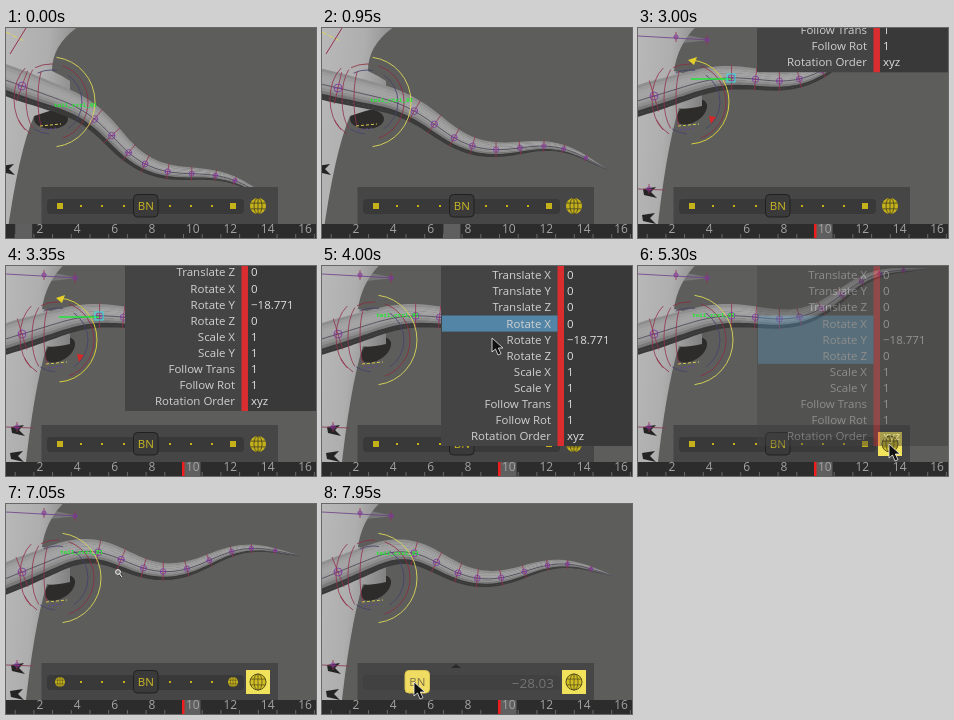
Write an HTML page that moves like this. It is 310 px wide and 210 px high and loops after 8 s.

```html
<!DOCTYPE html>
<html lang="en">
<head>
<meta charset="utf-8">
<title>Tail animation</title>
<style>
html, body { margin: 0; width: 310px; height: 210px; overflow: hidden; background: #5d5e5b; }
svg { display: block; font: 11.5px "Open Sans", sans-serif; }
</style>
</head>
<body>
<svg id="stage" width="310" height="210" viewBox="0 0 310 210"></svg>
<script>
const stage = document.getElementById('stage');
const LOOP = 8000, STEP = 50, TAIL_LENGTH = 288;

// lift: 0 for a lowered hip, 1 for a raised one. bend: tail headings in degrees from root to tip.
const pose = (rootY, lift, ...bend) => [rootY, lift, ...bend];
const LOW = pose(58, 0, 20, 47, 2, 33);
const MID = pose(60, 0, 13, 36, -7, 29);
const HIGH = pose(68, 1, -17, 6, -37, -2);
const BENT = pose(68, 1, -22, 23, -24, 12);
const DROPPED = pose(68, 1, -22, 28, -18, 18);
const BEND_AT = [30, 105, 195, 270];
const CYCLE = [[1, LOW], [7, MID], [10, HIGH], [12, HIGH], [18, LOW]];

const ROWS = ['Translate X|0', 'Translate Y|0', 'Translate Z|0', 'Rotate X|0', 'Rotate Y|−18.771', 'Rotate Z|0',
  'Scale X|1', 'Scale Y|1', 'Follow Trans|1', 'Follow Rot|1', 'Rotation Order|xyz'];

const clamp = v => Math.max(0, Math.min(1, v));
const lerp = (a, b, k) => Array.isArray(a) ? a.map((v, i) => lerp(v, b[i], k)) : a + (b - a) * k;
const ease = k => k * k * (3 - 2 * k);
const same = k => k;
const span = (t, from, to) => clamp((t - from) / (to - from));
const within = (t, from, to) => t >= from && t < to;

function track(t, keys, curve = same) {
  const i = keys.findIndex(k => k[0] > t);
  if (i < 0) return keys[keys.length - 1][1];
  if (i === 0) return keys[0][1];
  const [a, b] = [keys[i - 1], keys[i]];
  return lerp(a[1], b[1], curve((t - a[0]) / (b[0] - a[0])));
}

const rect = (x, y, w, h, fill, more = '') =>
  `<rect x="${x}" y="${y}" width="${w}" height="${h}" fill="${fill}" ${more}/>`;
const line = (x1, y1, x2, y2, color, width = 1, dash = '') =>
  `<path d="M${x1} ${y1}L${x2} ${y2}" stroke="${color}" stroke-width="${width}" stroke-dasharray="${dash}"/>`;
const oval = (x, y, rx, ry, color, width = 1, dash = '') =>
  `<ellipse cx="${x}" cy="${y}" rx="${rx}" ry="${ry}" fill="none" stroke="${color}" stroke-width="${width}" pathLength="100" stroke-dasharray="${dash}"/>`;
const poly = (pts, fill) => `<polygon points="${pts.map(p => p.map(v => v.toFixed(1))).join(' ')}" fill="${fill}"/>`;
const text = (x, y, s, fill, more = '') => `<text x="${x}" y="${y}" fill="${fill}" ${more}>${s}</text>`;

function frameAt(t) {
  if (t < 1050) return 1 + Math.round(t * .024) % 17;
  return track(t, [[1250, 9], [1450, 5], [1950, 12.4], [2000, 12], [2050, 10]]);
}

function poseAt(t) {
  if (t >= 7300) return lerp(BENT, DROPPED, ease(span(t, 7500, 7950)));
  if (t >= 5500) return lerp(HIGH, BENT, ease(span(t, 5500, 6150)));
  return track(frameAt(t), CYCLE, ease);
}

// Walks along the tail in equal steps, turning with the bend.
function spineOf([rootY, , ...bend]) {
  const step = 4, keys = BEND_AT.map((u, i) => [u, bend[i]]);
  const first = bend[0] * Math.PI / 180, points = [];
  let x = 16 - 28 * Math.cos(first), y = rootY - 28 * Math.sin(first);
  for (let u = -28; u <= TAIL_LENGTH; u += step) {
    const a = track(u, keys, ease) * Math.PI / 180;
    points.push({ x, y, nx: -Math.sin(a), ny: Math.cos(a), w: 15 * Math.pow(1 - Math.max(0, u) / TAIL_LENGTH, .8) + .2 });
    x += step * Math.cos(a);
    y += step * Math.sin(a);
  }
  return points;
}
const pointAt = (spine, u) => spine[Math.round((u + 28) / 4)];

function marker({ x, y, nx, ny, w }) {
  const r = 1.4 + w * .17, l = w + 1;
  return line(x - nx * l, y - ny * l, x + nx * l, y + ny * l, '#96304f', .8)
    + oval(x, y, r, r, '#7d35a0', .8) + line(x - r, y, x + r, y, '#7d35a0', .8);
}

function tail(spine) {
  const edge = f => spine.map(p => [p.x + p.nx * p.w * f, p.y + p.ny * p.w * f]);
  let out = '';
  for (let i = 0; i < 10; i++) {
    const f = i / 5 - 1, v = 58 + 106 * Math.sqrt(Math.max(0, 1 - (f + .4) ** 2));
    out += poly([...edge(f), ...edge(Math.min(1, f + .22)).reverse()], `rgb(${v},${v},${v})`);
  }
  out += `<polyline points="${edge(0).map(p => p.map(v => v.toFixed(1))).join(' ')}" fill="none" stroke="#4b4355" stroke-width=".8"/>`;
  out += marker(pointAt(spine, 0));
  for (let u = 80; u < 270; u += 23) out += marker(pointAt(spine, u));
  return out;
}

function body(lift) {
  const v = (low, high) => lerp(low, high, lift).toFixed(1);
  const skin = `M-5-5H${v(78, 62)}Q${v(46, 40)} 14 ${v(46, 36)} 43Q55 47 64 53V78`
    + `Q45 82 ${v(28, 41)} ${v(88, 80)}Q${v(12, 27)} 125 ${v(0, 18)} 215H-5Z`;
  const x = lerp(45, 54, lift), y = lerp(91, 84, lift);
  return `<ellipse cx="${x}" cy="${y}" rx="17" ry="10" fill="#2d2c2b" transform="rotate(${-35 * lift} ${x} ${y})"/>`
    + `<path d="${skin}" fill="url(#skin)"/>`;
}

const feather = (x, y) => poly([[x, y], [x + 13, y - 2], [x + 8, y + 3], [x + 14, y + 9], [x + 1, y + 6]], '#242424');

function rings(lift, spine, selected) {
  const x = lerp(45, 51, lift), y = 74;
  const labelY = 50 + (pointAt(spine, 80).y - 51) * .68;
  let out = oval(x, y, 37, 38, '#8d2b42', .8, '20 14 8 26 8 4 20') + oval(x, y, 31, 32, '#44406f', .8, '16 10 8 34 10 6 16');
  for (let i = 0; i < 3; i++) out += oval(x - 4 - 5 * i, y - 3, 9 + 7 * i, 36, '#92304b', .8, '0 32 36 32');
  if (selected) {
    out += oval(x, y, 40, 42, '#d8ce3d', 1, '24 52 24')
      + `<path d="M50 32l9-3-3 8z" fill="#e5cf28"/><path d="M71 88l7 1-5 7z" fill="#d52828"/>`
      + line(53, 51, 93, 51, '#22e43a', 1.4) + rect(89, 46, 8, 8, 'none', 'stroke="#30e0e0"');
  } else {
    out += oval(x, y, 44, 45, '#dcd75a', .9, '23 54 23')
      + text(x + 3, labelY + 2, 'tail_ctrl_01', '#25e534', 'font-size="6" font-weight="700" font-family="Noto Sans Mono, monospace"');
  }
  return out + line(x - 11, 98, x + 10, 96, '#d4c94c', 1, '3 2') + line(x - 9, 102, x + 6, 100, '#64409a', 1, '2 2');
}

function scene(t) {
  const now = poseAt(t), lift = now[1], spine = spineOf(now);
  let out = rect(0, 0, 310, 210, '#5d5e5b');
  if (lift > .5) out += poly([[35, 4], [72, 12], [35, 16]], '#77777a');
  out += body(lift) + tail(spine);
  if (lift > .5) {
    out += feather(5, 161) + feather(4, 187)
      + line(0, 8, 72, 12, '#6d3c86', .8) + line(0, 161, 27, 162, '#873454', .8);
    [[38, 9], [69, 12], [11, 161]].forEach(([x, y]) => out += marker({ x, y, nx: 0, ny: 1, w: 4 }));
  } else {
    out += feather(-5, 138) + line(0, 4, 18, 13, '#dcd75a', 1, '5 2') + line(4, 26, 20, 0, '#96304f');
  }
  return out + rings(lift, spine, within(t, 2450, 3700));
}

function timeline(t) {
  const tick = n => 177 + (n - 10) * 18.7;
  let out = rect(0, 196, 310, 14, '#2c2c2c') + rect(tick(Math.round(frameAt(t))) + .5, 196, 17, 14, '#5f5f5f');
  for (let n = 1; n <= 17; n++) {
    out += line(tick(n) + .5, 206, tick(n) + .5, 210, '#696969');
    if (n % 2 === 0) out += text(tick(n) + 3, 205, n, '#a3a3a3', 'font-size="12"');
  }
  return out + (t >= 2450 ? rect(176, 196, 2.5, 14, '#ee1c1c') : '');
}

function globe(x, y, r, color, ink) {
  const w = r / 10, h = r * .36, half = r * .93;
  return `<circle cx="${x}" cy="${y}" r="${r}" fill="${color}"/>` + oval(x, y, r * .5, r, ink, w)
    + line(x, y - r, x, y + r, ink, w) + line(x - half, y - h, x + half, y - h, ink, w) + line(x - half, y + h, x + half, y + h, ink, w);
}

const KNOB = 139.5;
const dragging = t => within(t, 5500, 6550) || t >= 7500;
const knobX = t => !dragging(t) ? KNOB
  : t < 7500 ? lerp(KNOB, 56, span(t, 5500, 6150)) : lerp(KNOB, 95, span(t, 7500, 7950));

function toolbar(t) {
  const gold = '#c5b21b', drag = dragging(t), x = knobX(t), lit = t >= 5200;
  let out = rect(35.5, 159, 236.5, 37, '#464646') + rect(41, 171, 197, 15, drag ? '#414141' : '#393939', 'rx="4"');
  if (drag) {
    out += `<path d="M129 164l5-4 5 4z" fill="#2b2b2b"/>`
      + text(232, 184, '−' + ((KNOB - x) * .62989).toFixed(2), '#737373', 'text-anchor="end" font-size="13.5"');
  } else {
    for (const side of [-1, 1]) {
      for (let i = 0; i < 3; i++) out += rect(Math.round(139.5 + side * (23 + 21.3 * i)), 177, 2, 2, gold);
      const end = 140.5 + side * 86.5;
      out += t >= 5350 ? globe(end, 178, 5, gold, '#46421f') : rect(end - 3, 175, 6, 6, gold);
    }
  }
  out += rect(x - 12, 166.5, 24.5, 22.5, drag ? '#f0dc63' : '#3a3a3a', `rx="4" stroke="${drag ? '#d8c54d' : '#202020'}"`)
    + text(x + .3, 182, 'BN', drag ? '#77704b' : '#cbb923', 'text-anchor="middle"');
  if (lit) out += rect(240, 166, 24, 24, '#f1e25b');
  return out + globe(252, 178, 8, lit ? '#d1bf25' : gold, lit ? '#5c541b' : '#403d23')
    + (lit ? oval(252, 178, 8, 8, '#5c541b') : '');
}

function channels(t) {
  if (!within(t, 2850, 5550)) return '';
  const rowHeight = 16.1, dy = track(t, [[2850, -179], [3350, -35], [3650, 0]]);
  const picked = Math.floor(3 * span(t, 3850, 4200));
  let out = rect(119, -30, 191, 210, '#444') + rect(242, -30, 68, 210, '#393939') + rect(235.5, -30, 6.5, 210, '#d92d30')
    + rect(120, 49.5, 115.5, picked * rowHeight, '#5285a6');
  ROWS.forEach((row, i) => {
    const [label, value] = row.split('|'), y = 13.2 + i * rowHeight;
    out += text(229, y, label, '#d0d0d0', 'text-anchor="end"') + text(245, y, value, '#dedede');
  });
  return `<g transform="translate(0 ${dy})" opacity="${1 - span(t, 4950, 5550)}">${out}</g>`;
}

function cursor(t) {
  if (t < 1950 || within(t, 2900, 3700)) return '';
  const path = [[2050, [102, 67]], [2200, [92, 58]], [2900, [92, 58]], [3700, [150, 52]], [4300, [190, 92]], [4650, [190, 92]],
    [5200, [251, 178]], [5350, [251, 178]], [5500, [137, 178]], [6550, [53, 178]], [7000, [110, 66]], [7300, [110, 66]], [7500, [137, 178]]];
  const [x, y] = dragging(t) ? [knobX(t) - 3, 178] : track(t, path, ease);
  const shape = t < 2900 || within(t, 6900, 7300)
    ? line(3, 3, 6, 7, '#222', 2.6) + line(3, 3, 6, 7, '#eee', 1.2) + '<circle cx="2" cy="2" r="2.4" fill="#777" stroke="#eee"/>'
    : '<path d="M0 0v14l3.5-3 2.5 6 3-1.3-2.7-5.7h4.7z" fill="#111" stroke="#eee" stroke-width=".8"/>';
  return `<g transform="translate(${x} ${y})">${shape}</g>`;
}

const defs = `<defs><linearGradient id="skin" x2="1" y2=".3"><stop stop-color="#bababa"/>`
  + `<stop offset=".55" stop-color="#aeaeae"/><stop offset="1" stop-color="#828282"/></linearGradient></defs>`;

const start = performance.now();
let shown = -1;
function update() {
  const t = Math.floor((performance.now() - start) % LOOP / STEP) * STEP;
  if (t !== shown) stage.innerHTML = defs + scene(t) + timeline(t) + toolbar(t) + channels(t) + cursor(t);
  shown = t;
  requestAnimationFrame(update);
}
update();
</script>
</body>
</html>
```
